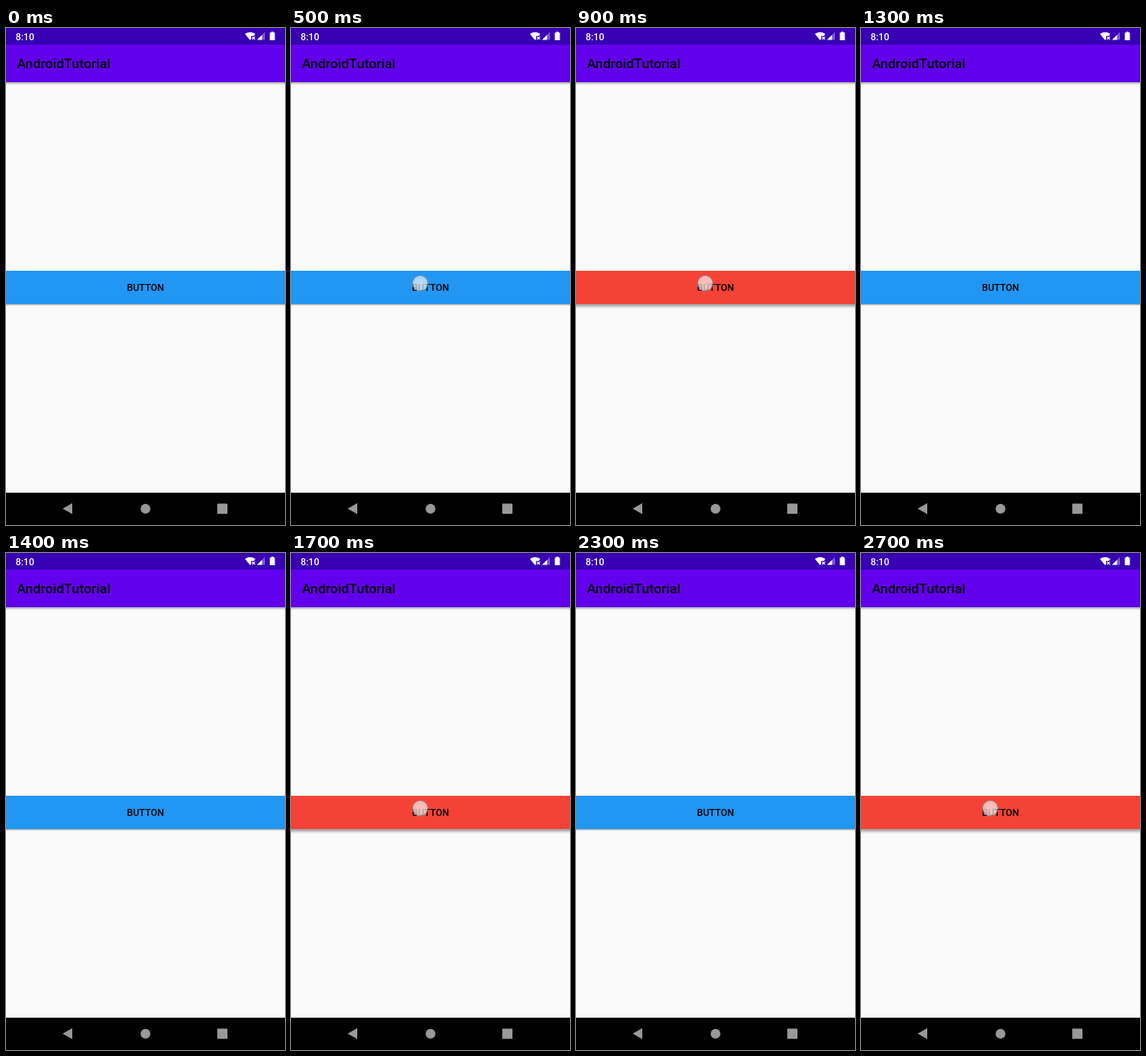
An HTML page for the animation above (2.9 s loop, 320 by 569 pixels).

```html
<!DOCTYPE html>
<html lang="en">
<head>
<meta charset="utf-8">
<title>Button press</title>
<style>
  html, body { margin: 0; width: 100%; height: 100%; overflow: hidden; background: #fafafa; }
  .stage { position: relative; width: 320px; height: 569px; overflow: hidden; background: #fafafa; }
  .stage > * { position: absolute; }
  .bar { left: -20px; right: -20px; }
  .status { top: 0; height: 19px; background: #3700b3; }
  .toolbar {
    top: 19px; height: 43px; background: #6200ee;
    box-shadow: 0 1px 2px rgba(0, 0, 0, .34), 0 2px 3px rgba(0, 0, 0, .12);
  }
  .nav { top: 532px; height: 37px; background: #000; }
  .button {
    --rest: 0 1px 1.5px rgba(0, 0, 0, .36), 0 0 2px rgba(0, 0, 0, .12);
    --rising: 0 2px 2.5px rgba(0, 0, 0, .34), 0 1px 3px rgba(0, 0, 0, .13);
    --raised: 0 3px 3px rgba(0, 0, 0, .3), 0 1px 4px rgba(0, 0, 0, .16);
    top: 278px; height: 38px; background: #2196f3; box-shadow: var(--rest);
    animation: tint 2.9s step-end infinite, lift 2.9s step-end infinite;
  }
  svg { left: 0; top: 0; }
  text { font-family: Roboto, sans-serif; font-weight: 500; }
  .touch { opacity: 0; animation: touch 2.9s step-end infinite; }

  /* Presses begin at 0.5 s, 1.5 s and 2.5 s; each step is 0.1 s. */
  @keyframes touch {
    0%, 34.48%, 68.96% { opacity: 0; }
    17.24%, 51.72%, 86.2% { opacity: 1; }
    100% { opacity: 0; }
  }
  @keyframes tint {
    0%, 37.93%, 72.41% { background: #2196f3; }
    20.68%, 55.17%, 89.65% { background: #f44336; }
    100% { background: #2196f3; }
  }
  @keyframes lift {
    0%, 41.37%, 75.86% { box-shadow: var(--rest); }
    20.68%, 37.93%, 55.17%, 72.41%, 89.65% { box-shadow: var(--rising); }
    24.13%, 58.62%, 93.1% { box-shadow: var(--raised); }
    100% { box-shadow: var(--rest); }
  }
</style>
</head>
<body>
<div class="stage">
  <div class="bar toolbar"></div>
  <div class="bar status"></div>
  <div class="bar button"></div>
  <div class="bar nav"></div>
  <svg width="320" height="569" viewBox="0 0 320 569">
    <defs>
      <radialGradient id="glow">
        <stop offset="0" stop-color="#fff" stop-opacity=".68"/>
        <stop offset=".8" stop-color="#f4f4f4" stop-opacity=".66"/>
        <stop offset=".86" stop-color="#999" stop-opacity=".6"/>
        <stop offset="1" stop-color="#888" stop-opacity=".12"/>
      </radialGradient>
    </defs>

    <text x="11" y="13.6" font-size="10.89" fill="#fff">8:10</text>
    <text x="12.4" y="46.4" font-size="15.56">AndroidTutorial</text>
    <text x="160" y="301" font-size="10.89" text-anchor="middle">BUTTON</text>

    <g fill="#fff">
      <path d="M274 6.8Q280 2.6 286 6.8L284.3 9H281.2V12.6L280 14Z"/>
      <path d="M282.3 9.8L285.5 13M285.5 9.8L282.3 13" stroke="#fff" stroke-width="1.1"/>
      <path d="M288 13.6L297 4.6V13.6Z" opacity=".35"/>
      <path d="M288 13.6L293.6 8V13.6Z"/>
      <path d="M302.6 5.2H304.2V4.2H306.8V5.2H308.4V14H302.6Z"/>
    </g>

    <g fill="#999">
      <path d="M65 550.3L76 544V556.6Z"/>
      <circle cx="160" cy="550.4" r="5.6"/>
      <rect x="242.3" y="544.5" width="11.7" height="11.7" rx=".8"/>
    </g>

    <circle class="touch" cx="148.2" cy="292.3" r="10" fill="url(#glow)"/>
  </svg>
</div>
</body>
</html>
```
